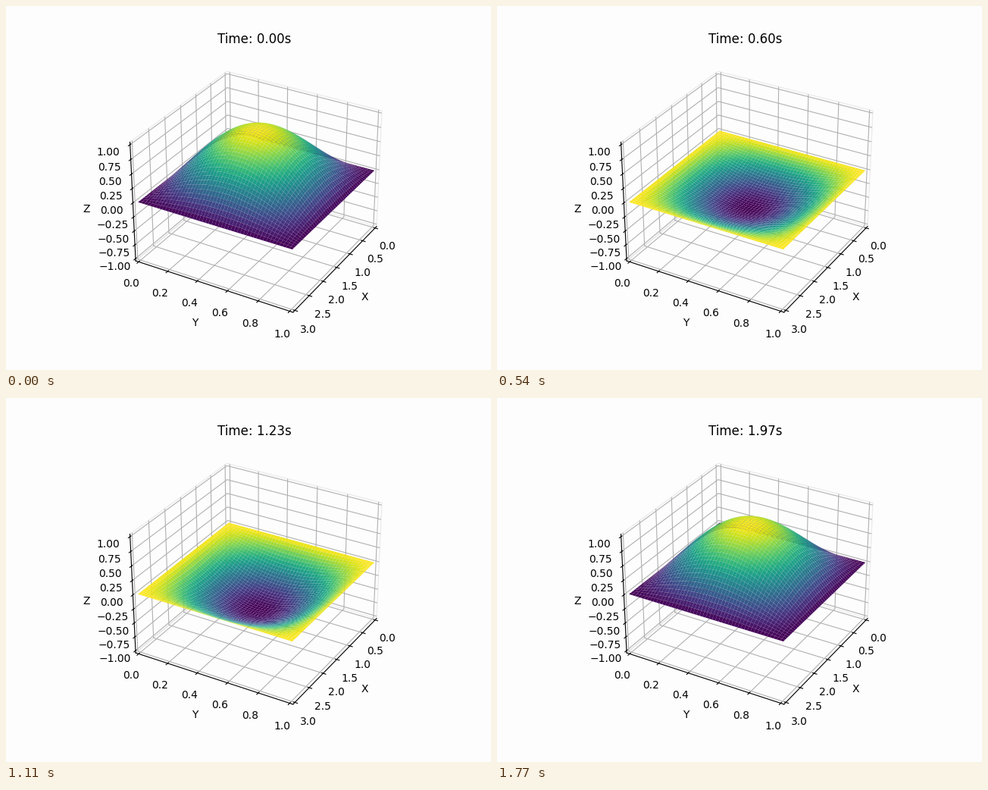
Animation of 640x480 px, one loop 1.8 s. Source, as a matplotlib script:

```python
import numpy as np
import matplotlib.pyplot as plt
from matplotlib.animation import FuncAnimation

LX, LY, SPEED = 3.0, 1.0, 1.0
FRAMES, INTERVAL, FPS = 60, 30, 30
PAPER = "#fdfdfd"

OMEGA = SPEED * np.pi * np.hypot(1 / LX, 1 / LY)
X, Y = np.meshgrid(np.linspace(0, LX, 50), np.linspace(0, LY, 50))
MODE = np.sin(np.pi * X / LX) * np.sin(np.pi * Y / LY)

fig = plt.figure(figsize=(6.4, 4.8), dpi=100, facecolor=PAPER)
ax = fig.add_subplot(projection="3d", facecolor=PAPER)
ax.view_init(elev=30, azim=30)


def padded(lo, hi):
    pad = (hi - lo) / 48
    return lo - pad, hi + pad


ax.set(xlim=padded(0, LX), ylim=padded(0, LY), zlim=padded(-1, 1),
       xlabel="X", ylabel="Y", zlabel="Z")
for axis in (ax.xaxis, ax.yaxis, ax.zaxis):
    axis.pane.set_facecolor(PAPER)
    axis.pane.set_edgecolor("#dcdcdc")


def draw(i):
    """Standing wave of a rectangular membrane at step i."""
    t = i / FPS
    for old in list(ax.collections):
        old.remove()
    ax.plot_surface(X, Y, MODE * np.cos(OMEGA * t), cmap="viridis")
    ax.set_title(f"Time: {t:.2f}s")


anim = FuncAnimation(fig, draw, frames=FRAMES, interval=INTERVAL,
                     init_func=lambda: None, repeat=True, repeat_delay=0)
plt.show()
```
